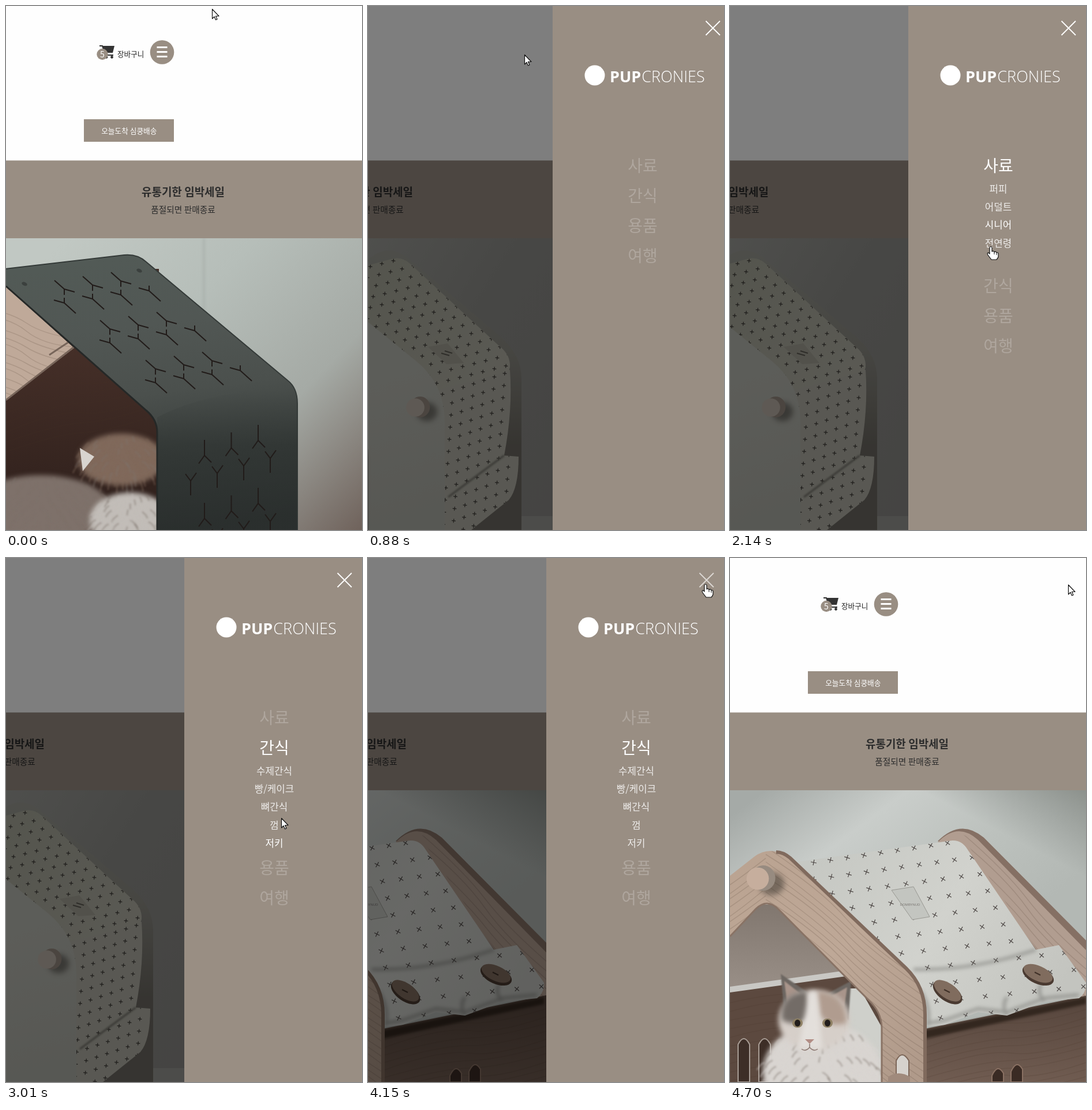
An HTML page with a canvas for the animation above (5.23 s loop, 617 px wide and 907 px high).

```html
<!DOCTYPE html>
<html lang="ko">
<head>
<meta charset="utf-8">
<style>
html, body { margin: 0; width: 100%; height: 100%; overflow: hidden; background: #fff }
canvas { display: block }
</style>
</head>
<body>
<canvas id="stage" width="617" height="907"></canvas>
<script>
const stage = document.getElementById('stage').getContext('2d');
let ctx = stage;
const LOOP = 5230, TAUPE = '#998e83', PHOTO_W = 830, SHIFT = 312, SUB_H = 156;
const KR = '"Noto Sans CJK KR", "Noto Sans CJK", "Noto Sans KR", sans-serif';
const LATIN = '"Open Sans", sans-serif';

// ---------- timing ----------
const clamp = v => Math.max(0, Math.min(1, v));
// CSS "ease", i.e. cubic-bezier(.25, .1, .25, 1)
function ease(p) {
  const bez = (a, b, u) => 3 * a * u * (1 - u) ** 2 + 3 * b * u * u * (1 - u) + u ** 3;
  let lo = 0, hi = 1;
  for (let i = 0; i < 18; i++) {
    const mid = (lo + hi) / 2;
    if (bez(.25, .25, mid) < p) lo = mid; else hi = mid;
  }
  return bez(.1, 1, lo);
}
const tween = (t, start, length) => ease(clamp((t - start) / length));

const mouse = [[0, 357, 5], [60, 357, 5], [440, 271, 84], [900, 271, 84], [1100, 400, 112],
  [1300, 546, 285], [1480, 463, 283], [1700, 460, 300], [2130, 453, 417], [2200, 453, 417],
  [2400, 462, 480], [2850, 472, 486], [3010, 477, 450], [3340, 472, 420], [3480, 472, 420], [4030, 586, 46]];
function mouseAt(t) {
  const i = mouse.findIndex(k => k[0] > t);
  if (i < 0) return mouse[mouse.length - 1].slice(1);
  if (i === 0) return mouse[0].slice(1);
  const [a, b] = [mouse[i - 1], mouse[i]], p = (t - a[0]) / (b[0] - a[0]), s = p * p * (3 - 2 * p);
  return [a[1] + (b[1] - a[1]) * s, a[2] + (b[2] - a[2]) * s];
}

// ---------- drawing helpers ----------
function shape(d, fill, stroke, width = 1) {
  const path = new Path2D(d);
  if (fill) { ctx.fillStyle = fill; ctx.fill(path); }
  if (stroke) { ctx.strokeStyle = stroke; ctx.lineWidth = width; ctx.stroke(path); }
}
function oval(x, y, rx, ry, fill, turn = 0) {
  ctx.beginPath();
  ctx.ellipse(x, y, rx, ry, turn, 0, 7);
  ctx.fillStyle = fill;
  ctx.fill();
}
function rect(x, y, w, h, fill) {
  ctx.fillStyle = fill;
  ctx.fillRect(x, y, w, h);
}
function gradient(x0, y0, x1, y1, ...colors) {
  const g = ctx.createLinearGradient(x0, y0, x1, y1);
  colors.forEach((c, i) => g.addColorStop(i / (colors.length - 1), c));
  return g;
}
function text(str, x, y, font, fill, align = 'center') {
  ctx.font = font;
  ctx.fillStyle = fill;
  ctx.textAlign = align;
  ctx.fillText(str, x, y);
}
// Hangul centred vertically on y
const hangul = (str, x, y, size, fill, weight = 400, align) =>
  text(str, x, y + size * .4, `${weight} ${size}px ${KR}`, fill, align);
function clipped(d, draw) {
  ctx.save();
  ctx.clip(new Path2D(d));
  draw();
  ctx.restore();
}
function soft(radius, draw) {
  ctx.filter = `blur(${radius}px)`;
  draw();
  ctx.filter = 'none';
}
// three arms around a centre
function fork(x, y, arms) {
  for (const [dx, dy] of arms) shape(`M${x} ${y}l${dx} ${dy}`, null, '#211b19', 2);
}
function cross(x, y, r, turn, color) {
  const c = r * Math.cos(turn), s = r * Math.sin(turn);
  shape(`M${x - c} ${y - s}L${x + c} ${y + s}M${x + s} ${y - c}L${x - s} ${y + c}`, null, color, 1.2);
}
function lattice(x, y, ux, uy, vx, vy, cols, rows) {
  for (let i = 0; i < cols; i++)
    for (let j = 0; j < rows; j++)
      cross(x + i * ux + j * vx, y + i * uy + j * vy, 3.4, .12, '#3a3733');
}
function knob(x, y, r, color) {
  soft(5, () => oval(x + r, y + r * .4, r, r * .9, 'rgba(50,46,40,.5)'));
  oval(x + r * .35, y - 1, r * .95, r, '#978b80');
  oval(x - 2, y, r * .88, r * .88, color);
}
function grain(x, y, w, slope, count, gap) {
  for (let i = 0; i < count; i++)
    shape(`M${x} ${y + i * gap}q${w / 3} ${w * slope / 3 - 12 - 5 * Math.sin(i * 2)} ${w / 2} ${w * slope / 2}t${w / 2} ${w * slope / 2}`,
      null, 'rgba(70,52,42,.16)', 1.5);
}
// soft tufts spread evenly inside an ellipse
function fur(x, y, rx, ry, color, n = 70) {
  soft(4, () => oval(x, y, rx, ry, color));
  ctx.globalAlpha = .4;
  soft(1.5, () => {
    for (let i = 0; i < n; i++) {
      const a = i * 2.4, r = Math.sqrt(i / n);
      const px = x + rx * r * Math.cos(a), py = y + ry * r * Math.sin(a);
      shape(`M${px} ${py}q${9 * Math.cos(a)} 4 ${13 * Math.cos(a)} ${14 + 4 * Math.sin(a)}`, null, i % 3 ? color : '#7d736c', 3);
    }
  });
  ctx.globalAlpha = 1;
}

// ---------- the three photos ----------
function darkHouse() {
  rect(-200, 402, 830, 505, gradient(100, 402, 617, 907, '#c1c8c3', '#b6beb9', '#a5aaa5', '#6f625b'));
  soft(2, () => shape('M343 402V530', null, '#a2aaa5', 2));
  rect(-200, 455, 465, 452, gradient(0, 590, 0, 907, '#452f28', '#2d1f1b'));
  grain(0, 670, 270, -.25, 7, 17);
  shape('M-200 440L0 485 118 592 0 682-200 830Z', '#bfa999');
  clipped('M-200 440L0 485 118 592 0 682Z', () => grain(-60, 520, 190, .3, 12, 14));
  shape('M118 590L0 682M75 604L108 582', null, '#77655a', 3);
  fur(200, 785, 75, 45, '#80695b', 90);
  fur(60, 870, 120, 58, '#7e716a', 120);
  shape('M128 765l25 15-20 25z', '#d8d4cf');
  fur(215, 890, 70, 48, '#c2bdb8', 100);
  shape('M-10 456L205 431Q228 429 243 443L488 648Q505 661 505 688V907H262V738Q262 716 243 700L0 485Z',
    gradient(240, 431, 300, 907, '#525a56', '#515754', '#4b504d', '#383d3b', '#2c302f'));
  shape('M-10 456L205 431Q228 429 243 443L488 648Q505 661 505 688V907', null, '#343a38', 2);
  shape('M0 485L243 700Q262 716 262 738V907', null, '#252827', 3);
  shape('M262 712Q350 665 500 662L505 690V907H262Z', gradient(0, 665, 0, 760, 'rgba(45,50,48,0)', 'rgba(40,45,43,.4)'));
  for (let row = 0; row < 3; row++)
    for (let col = 0; col < 4; col++) {
      const x = 101 + row * 79 + col * 49, y = 490 + row * 69 - col * 7;
      if (col < 3) fork(x, y, [[-17, -15], [18, 5], [0, 10]]);
      fork(x, y + 24, [[-18, -5], [20, 18], [0, -9]]);
    }
  for (let row = 0; row < 2; row++)
    for (let col = 0; col < 4; col++) {
      const y = row * 109 - col * 13;
      if (col < 3) fork(344 + col * 46.5, 778 + y, [[0, -27], [-10, 14], [12, 12]]);
      fork(320 + col * 46, 822 + y, [[-9, -12], [10, -14], [0, 25]]);
    }
  oval(231, 458, 5, 3, '#3b403e', .4);
  oval(32, 481, 5, 3, '#3b403e', .4);
}

function whiteHouse() {
  rect(-200, 402, 830, 505, gradient(-100, 402, 617, 850, '#939591', '#a3a49f', '#90908c', '#8b8a87'));
  rect(560, 883, 70, 24, '#9a9995');
  shape('M300 440Q335 408 370 436L530 572Q567 604 567 645V907H400V600Z',
    gradient(0, 430, 0, 760, '#9b9c94', '#8e8d85', '#6c6962'));
  const roof = 'M205 475L345 437Q362 434 375 447L530 590Q548 604 547 625L545 632 425 664 400 640Z';
  const side = 'M400 630L547 630Q552 700 537 778L562 780Q562 835 545 855L480 907H434V720Z';
  shape(side, '#b3b2a7');
  shape(roof, gradient(250, 450, 500, 650, '#a9aa9b', '#b5b4a8'));
  clipped(roof, () => lattice(190, 462, 20, -5, 15, 14, 20, 20));
  clipped(side, () => lattice(430, 672, 18, -6, -1.5, 21, 8, 16));
  soft(1.5, () => shape('M440 850Q500 805 537 778', null, '#74726a', 3));
  shape('M405 590l34-6 28 34-30 2z', '#a5a397');
  shape('M428 601l14 4m-8-8l13 4', null, '#5d5a52', 2);

  shape('M-68 907V690Q-66 658-42 634L140 472Q172 446 206 470L385 615Q434 655 434 720V907Z',
    gradient(150, 460, 300, 907, '#b9bcb4', '#babbb3', '#b0b1a9'));
  const door = 'M52 907V781A124.5 125 0 0 1 301 781V907Z';
  shape(door, gradient(52, 656, 301, 907, '#8e8780', '#5a524b', '#3f3934'));
  clipped(door, () => {
    shape('M40 640H150L128 770 52 810Z', '#938c84');
    lattice(56, 690, 18, -5, -1, 21, 5, 7);
    shape('M52 800Q130 790 180 907H52Z', '#aaa59e');
    fur(195, 850, 75, 75, '#8d8178', 120);
    fur(178, 735, 68, 58, '#a99d93', 140);
    soft(5, () => oval(155, 772, 27, 30, '#4b423d'));
    oval(150, 772, 11, 8, '#26211f');
    fur(160, 830, 42, 28, '#9b9087', 50);
    fur(270, 905, 45, 22, '#b5afa8', 40);
  });
  shape(door, null, '#77756f', 2);
  fur(-55, 850, 70, 75, '#a9a9a2', 110);
  for (const [x, y] of [[160, 493], [-42, 672], [385, 695]]) knob(x, y, 18, '#beb4a9');
  oval(172, 576, 13, 13, '#6f675f');
  ctx.save();
  ctx.translate(63, 618);
  ctx.rotate(.04);
  ctx.letterSpacing = '7px';
  text('DOMBY', 0, 0, `700 20px ${LATIN}`, '#675d55', 'left');
  text('NUDDO.', 116, 0, `400 20px ${LATIN}`, '#675d55', 'left');
  ctx.restore();
}

function woodHouse() {
  rect(-200, 402, 830, 505, gradient(60, 402, 330, 760, '#a5aaa7', '#c9cdca', '#bcc1bd', '#b3b8b4'));
  shape('M330 402H630V560Z', gradient(480, 481, 559, 331, 'rgba(128,133,130,0)', '#80857f'));
  shape('M360 490Q400 450 440 484L630 675V780L530 690 400 500Z', '#857064');
  shape('M360 492Q395 456 430 488L630 692V780L540 690 400 500Z', '#b19d90');
  clipped('M400 478L430 488 630 692V780L540 690Z', () => grain(395, 470, 240, 1, 9, 16));

  // interior behind the gable
  shape('M-200 600H290V907H-200Z', gradient(0, 600, 0, 740, '#81776f', '#988e86'));
  shape('M-200 770L0 742 215 712V735L0 770-200 800Z', '#c9c8c4');
  shape('M-200 780L0 752 215 722 290 800V907H-200Z', '#5c493f');
  grain(0, 770, 270, -.1, 10, 15);
  shape('M200 745L225 745 263 812V907H200Z', '#cfd0cb');
  for (const x of [14, 50]) shape(`M${x} 907V842q10-20 20 0V907z`, '#3d2e27', '#a89d95', 2);

  // cat
  fur(160, 890, 103, 85, '#d9d5d1', 150);
  soft(1, () => {
    shape('M88 720L135 752 95 800ZM210 732L165 756 205 800Z', '#6d6762');
    shape('M94 732L122 754 100 778ZM203 743L176 758 198 778Z', '#a9958b');
  });
  soft(4, () => {
    oval(146, 800, 62, 52, '#d6cfc9');
    shape('M90 800Q84 755 132 750L140 790Q122 815 90 800Z', '#736c67');
    shape('M150 750Q202 752 202 805Q172 815 156 790Z', '#b09c8f');
    shape('M138 750L150 750 160 850H118Z', '#e3dfdb');
  });
  for (const x of [117, 169]) { oval(x, 805, 9, 8, '#8e8064'); oval(x, 805, 5, 6, '#211d1b'); }
  shape('M130 833h16l-8 8z', '#b28d85');
  shape('M138 841v6m0 0q-7 8-14 3m14-3q7 8 14 3', null, '#8a7770', 1.5);

  // lower box
  shape('M338 815L630 755V907H338Z', gradient(0, 770, 0, 907, '#58473e', '#705c51'));
  clipped('M338 815L630 755V907H338Z', () => grain(338, 835, 300, -.2, 12, 13));
  for (const [x, y] of [[454, 884], [487, 877]]) shape(`M${x} 907V${y + 12}q10-22 20-4V907z`, '#3a2b24', '#8a7163', 2);
  soft(2, () => shape('M338 817L617 760V772L338 832Z', '#33271f'));

  const cloth = 'M108 527L385 489Q402 488 412 505L530 678 570 670 617 735Q618 752 605 762L545 768 480 792 430 786 372 808 342 811 325 760 300 705Z';
  shape(cloth, gradient(150, 520, 560, 770, '#c6c8c3', '#d1d2cd', '#c3c4bf'));
  clipped(cloth, () => {
    for (let i = 0; i < 16; i++)
      for (let j = 0; j < 12; j++)
        cross(145 + 29 * i + j * i * 1.5, 527 - 4.2 * i + 29 * j, 5, .2 + i * .05, '#4b4543');
    soft(3, () => shape('M318 712Q420 715 530 678M342 811Q350 780 330 750M480 792Q470 775 480 760M545 768Q530 750 540 738M340 806L372 800 430 780 480 786 545 762 605 756',
      null, 'rgba(100,100,96,.5)', 5));
  });
  shape('M280 575L318 569 346 621 316 626Z', '#c3c5c0', '#989892', 1);
  text('DOMBYNUD', 312, 602, `6px ${LATIN}`, '#77736e');
  for (const [x, y, turn] of [[377, 750, .6], [534, 720, .42]]) {
    oval(x, y + 2, 29, 15, '#4a3a31', turn);
    oval(x, y - 1, 27, 13, '#806c5e', turn);
    shape(`M${x - 6} ${y - 3}l10 5`, null, '#3e3028', 2);
  }

  const front = 'M-200 735L0 550 42 517Q70 496 104 519L305 710Q338 742 338 790V907H263V812Q262 785 240 765L85 609Q65 588 45 607L0 655-200 850Z';
  shape(front, gradient(0, 510, 300, 907, '#baa391', '#bea897', '#b09a8a'));
  clipped(front, () => { grain(62, 500, 280, .8, 30, 13); grain(-200, 690, 262, -.65, 11, 13); });
  shape('M80 509Q92 509 104 519L305 710Q338 742 338 790V907', null, '#806a5d', 6);
  shape('M0 655L45 607Q65 588 85 609L240 765Q262 785 263 812V907', null, '#897365', 3);
  shape('M288 907V870q10-20 22 0V907z', '#d6d2cd', '#7c6658', 2);
  shape('M274 907V898q18-12 38 0V907z', '#a08a7c');
  knob(50, 555, 22, '#c6ae9d');
}

// each photo is painted once, then only moved
const photos = [darkHouse, whiteHouse, woodHouse].map(paint => {
  const canvas = document.createElement('canvas');
  canvas.width = PHOTO_W;
  canvas.height = 505;
  ctx = canvas.getContext('2d');
  ctx.translate(200, -402);
  paint();
  return canvas;
});
ctx = stage;

// ---------- page and menu ----------
function drawPage(t, shift) {
  rect(0, 0, 617, 907, '#fefefe');
  rect(0, 267.4, 617, 135, TAUPE);
  ctx.save();
  ctx.translate(-shift, 0);
  shape('M162 69H167L172 85H186', null, '#333', 2);
  shape('M167 69H188L185 81H171Z', '#333');
  oval(174, 88.5, 2.4, 2.4, '#333');
  oval(183.5, 88.5, 2.4, 2.4, '#333');
  oval(167, 83.5, 9.7, 9.7, TAUPE);
  text('5', 167, 88.5, `500 14px ${KR}`, '#fff');
  hangul('장바구니', 193, 83, 12.6, '#222', 400, 'left');
  oval(270.5, 80, 20.8, 20.8, TAUPE);
  for (const y of [71.5, 79.5, 87.5]) shape(`M261.5 ${y}h18`, null, '#fff', 3);
  rect(135, 196, 156, 39, TAUPE);
  hangul('오늘도착 심쿵배송', 213.3, 216, 12.7, '#fff', 500);
  hangul('유통기한 임박세일', 307, 321, 19, '#2d2d2d', 700);
  hangul('품절되면 판매종료', 307, 352, 14.7, '#2d2d2d');

  const position = tween(t, 482, 300) + tween(t, 3505, 300);
  photos.forEach((photo, i) => ctx.drawImage(photo, Math.round((i - position) * PHOTO_W) - 200, 402));
  ctx.restore();
}

const menu = [
  ['사료', ['퍼피', '어덜트', '시니어', '전연령']],
  ['간식', ['수제간식', '빵/케이크', '뼈간식', '껌', '저키']],
  ['용품', []],
  ['여행', []]
];
function drawPanel(t, left) {
  const opened = tween(t, 1520, 400), swapped = tween(t, 2300, 400);
  const open = [opened - swapped, swapped, 0, 0];
  const hoverY = mouseAt(t - 150)[1];
  ctx.save();
  ctx.translate(left, 0);
  rect(0, 0, 330, 907, TAUPE);
  const overClose = t > 4030 && t < 4400;
  shape('M265.5 26l24.5 24.5m0-24.5l-24.5 24.5', null, overClose ? '#ddd9d5' : '#fff', 1.8);
  oval(73, 120, 17.5, 17.5, '#fff');
  text('PUP', 99, 132, `700 27px ${LATIN}`, '#fff', 'left');
  const nameX = 100 + ctx.measureText('PUP').width;
  text('CRONIES', nameX, 132, `300 27px ${LATIN}`, '#fff', 'left');
  let y = 276;
  menu.forEach(([title, items], i) => {
    hangul(title, 156, y, 28, `rgba(255,255,255,${.22 + .78 * clamp(open[i] * 2)})`, open[i] > .5 ? 500 : 400);
    const height = open[i] * SUB_H;
    if (height > 0) clipped(`M0 ${y + 26}h330v${height}h-330z`, () =>
      items.forEach((item, j) => {
        const itemY = y + 40 + j * 31.3;
        const hovered = t < 3700 && Math.abs(itemY - hoverY) < 15;
        hangul(item, 156, itemY, 16.8, `rgba(255,255,255,${hovered ? 1 : .84})`, 500);
      }));
    y += 52 + height;
  });
  ctx.restore();
}

const handTimes = [[380, 510], [1450, 2850], [4000, 4260]];
function drawCursor(t) {
  const hand = handTimes.some(([from, to]) => t >= from && t < to);
  ctx.save();
  ctx.translate(...mouseAt(t));
  ctx.lineJoin = 'round';
  if (hand) {
    ctx.translate(-1, -1);
    shape('M-2 2Q0-1 2 2V9Q5 7 6 10Q9 8 10 11Q13 10 13 13V18Q12 21 10 23H1L-5 15Q-7 11-4 11L-2 13Z', '#fff', '#111', 1.2);
    shape('M6 10v4m4-3v4', null, '#111', 1);
  } else {
    shape('M.5 .5V17L4 13.5 6.5 19 9 18 6.5 12.5H12Z', '#fff', '#111', 1.2);
  }
  ctx.restore();
}

function frame() {
  const t = performance.now() % LOOP;
  const shift = Math.round(SHIFT * (tween(t, 509, 485) - tween(t, 4190, 480)));
  const dim = .5 * (clamp((t - 500) / 60) - clamp((t - 4190) / 480));
  drawPage(t, shift);
  rect(0, 0, 617, 907, `rgba(0,0,0,${dim})`);
  drawPanel(t, 621 - shift);
  drawCursor(t);
  requestAnimationFrame(frame);
}
frame();
</script>
</body>
</html>
```
